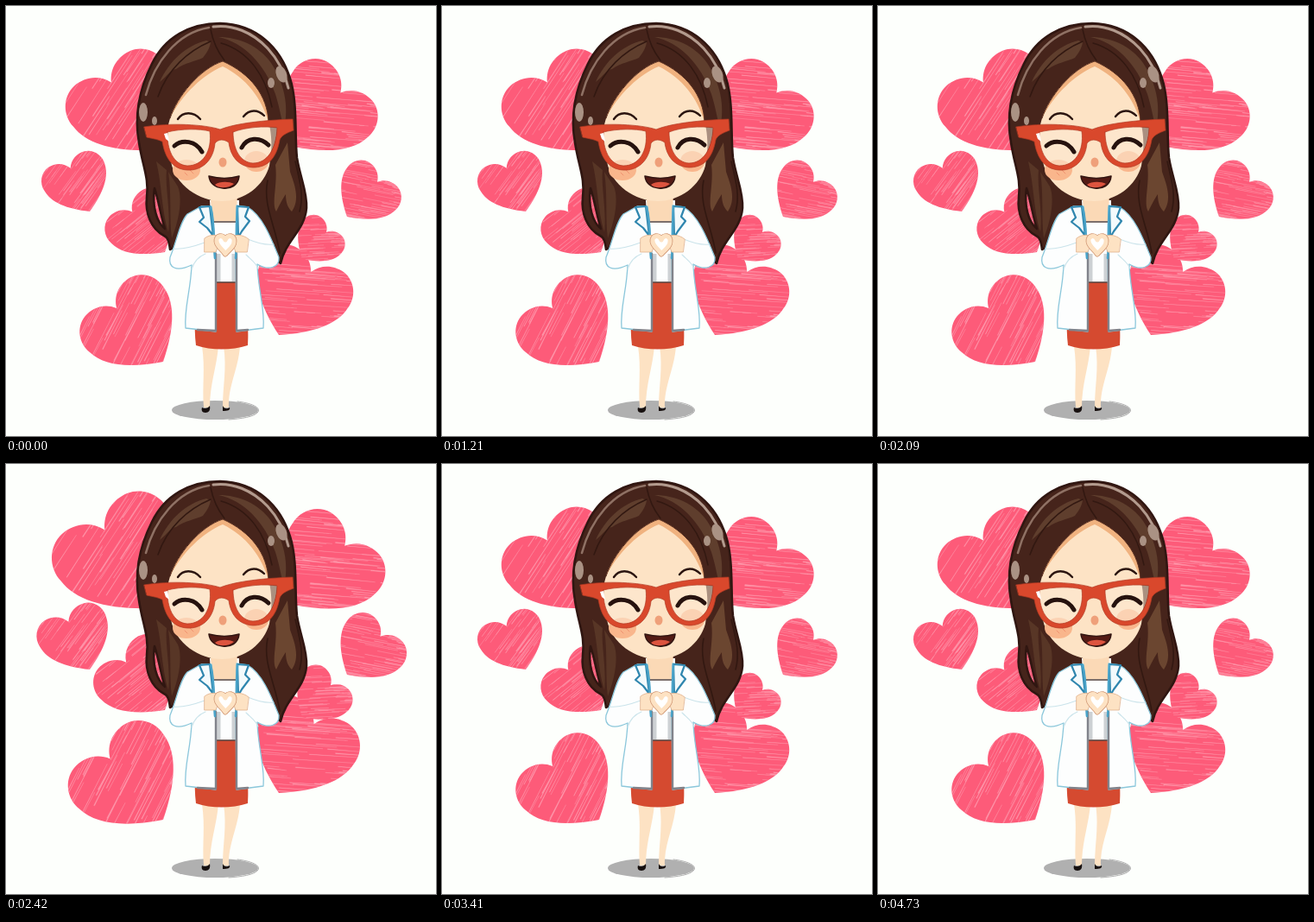
These frames come from a looping animation (498x498 px, 4.84 s). An HTML page:

```html
<!DOCTYPE html>
<html lang="en">
<head>
<meta charset="utf-8">
<title>Beating hearts</title>
<style>
  html, body { margin: 0; width: 100%; height: 100%; overflow: hidden; background: #fdfffc; }
  svg { display: block; width: 498px; height: 498px; }
</style>
</head>
<body>
<svg viewBox="0 0 498 498" fill="none" stroke-linecap="round" stroke-linejoin="round">
  <defs>
    <path id="heart" d="M0-82C7-96 21-101 34-99C50-96 60-80 57-64C55-42 35-20 0 0C-35-20-55-42-57-64C-60-80-50-96-34-99C-21-101-7-96 0-82Z"/>
    <clipPath id="inside"><use href="#heart"/></clipPath>
  </defs>

  <g id="hearts"></g>

  <g id="shadow">
    <ellipse cx="242" cy="468" rx="50" ry="11" fill="#b0b0b0"/>
    <path d="M268 458C285 460 295 465 292 470C288 476 272 478 258 479" stroke="#b0b0b0"/>
  </g>

  <g id="hair-back">
    <path fill-rule="evenodd" d="M248 20C290 21 318 48 329 84C338 112 334 150 337 176C341 200 349 215 348 234C346 260 324 271 318 298C308 290 298 276 292 255L210 255C204 272 196 279 190 282C189 274 188 268 183 266C168 258 161 240 163 222C166 200 158 185 154 158C148 125 155 95 169 67C184 36 213 20 248 20ZM172 211C169 231 174 250 184 258C179 242 177 226 172 211Z" fill="#46241b" stroke="#301611" stroke-width="2.6"/>
    <path d="M174 180C181 210 180 236 188 262C191 240 184 208 186 190ZM188 192C192 220 189 247 192 269C202 244 204 221 199 209Z" fill="#583626"/>
    <path d="M312 184C315 207 307 228 313 238C317 230 321 222 324 218C324 229 327 234 331 238C341 224 334 206 329 192L326 158Z" fill="#6b4630"/>
    <path d="M303 202C297 230 312 254 317 286M335 180C341 205 345 220 340 238" stroke="#321811" stroke-width="1.6"/>
    <path d="M232 40C208 46 189 64 178 88C188 80 190 74 197 73C207 66 219 64 228 60C232 55 236 49 237 42ZM246 36C275 42 299 66 312 102C317 118 319 132 322 142C328 115 322 89 307 66C293 46 270 36 246 36Z" fill="#5f3e2d"/>
    <path d="M162 103C172 65 198 31 235 25" stroke="#8f7164" stroke-width="2.6"/>
    <path d="M240 24C262 21 285 30 303 49C315 62 323 78 327 95" stroke="#b39b8e" stroke-width="3"/>
    <path d="M237 27C240 43 246 54 253 63M237 41C211 52 187 73 176 105M249 43C281 52 301 81 308 117" stroke="#321811" stroke-width="1.5"/>
  </g>

  <g id="legs">
    <path d="M227 394L246 394C244 418 236 438 236 465L229 465C227 440 231 420 227 394ZM252 394L271 394C269 421 257 440 258 465L251 465C251 440 256 420 252 394Z" fill="#fde2c3"/>
    <path d="M227 465C230 467 234 466 236 463C237 468 235 471 231 471C227 471 226 468 227 465ZM251 463C253 467 256 467 259 465C260 468 257 469 251 469Z" fill="#17100f"/>
  </g>

  <g id="clothes">
    <path d="M221 318L276 318C277 350 282 370 280 393C261 399 238 399 220 393C217 370 220 345 221 318Z" fill="#d54a30"/>
    <path d="M236 225L270 225L269 320L242 320Z" fill="#fdfefe"/>
    <path d="M236 212L268 212L267 249L239 249Z" fill="#fbd9b6"/>
    <path d="M246 287L246 319M264 287L264 319" stroke="#cdd1d4" stroke-width="5" stroke-linecap="butt"/>
    <path d="M240 250L267 250M243 320L267 320" stroke="#53403d" stroke-width="1.6"/>
    <g fill="#fdfefe" stroke="#8bc7db" stroke-width="1.3">
      <path d="M226 232L238 232L243 284L243 377L208 373C206 350 214 330 215 300C196 309 188 302 190 291C198 272 201 251 210 241Z"/>
      <path d="M267 231L280 233C296 242 306 266 316 291C317 303 304 307 291 299C292 330 300 350 298 373L267 377L266 284Z"/>
    </g>
    <path d="M230 274C219 278 203 282 194 281M231 287C221 291 217 298 215 305M280 270C292 275 303 277 310 276M278 288C284 294 290 298 292 304" stroke="#cbe4eb" stroke-width="1.1"/>
    <path d="M243 287L243 376L222 375M267 287L267 376L280 375" stroke="#81838b" stroke-width="2.4"/>
    <g fill="#f3fafc" stroke="#2f86ae" stroke-width="2.2">
      <path d="M224 233L236 232L240 266L233 257L224 250L229 245Z"/>
      <path d="M268 232L281 233L277 244L282 249L273 261L269 268Z"/>
    </g>
    <path d="M237 233C242 252 240 271 242 292M268 233C266 256 268 273 266 292" stroke="#4aa3c8" stroke-width="2.6"/>
  </g>

  <g id="hands">
    <path d="M230 269C236 264 246 264 249 269L243 285L230 285ZM281 270C274 264 264 264 260 269L266 285L279 285Z" fill="#fde2c3" stroke="#e0b08c" stroke-width=".8"/>
    <path id="gap" d="M254 271C251 264 243 266 244 273C245 279 251 282 254 287C258 282 264 279 264 273C265 266 257 264 254 271Z" stroke="#d6a07e" stroke-width="6.5"/>
    <use href="#gap" stroke="none"/>
    <path d="M254 271C251 264 243 266 244 273C245 279 251 282 254 287C258 282 264 279 264 273C265 266 257 264 254 271Z" fill="#fff" stroke="#fde2c3" stroke-width="5"/>
  </g>

  <g id="face">
    <path d="M251 64C225 72 198 105 190 130C184 148 187 166 191 180C196 208 224 226 250 226C276 226 299 208 305 185C313 150 304 92 251 64Z" fill="#fde3c5"/>
    <path d="M251 64C225 72 198 105 190 130C204 102 229 79 251 70C278 83 296 107 304 134C303 104 283 78 251 64Z" fill="#f0b27f"/>
    <path d="M251 64C225 72 198 105 190 130M304 134C303 104 283 78 251 64" stroke="#5a3021"/>
    <ellipse cx="209" cy="190" rx="16" ry="12" fill="#f9b68c"/>
    <ellipse cx="290" cy="180" rx="14" ry="12" fill="#f9b68c"/>
    <path d="M207 193L210 196M213 190L217 194" stroke="#ef9270"/>
    <ellipse cx="251" cy="181" rx="4.5" ry="5.5" fill="#efa07a"/>
    <path d="M199 131C205 122 217 122 225 131M275 128C282 119 292 120 299 127" stroke="#2b1510" stroke-width="2.4"/>
    <path d="M235 197C246 200 260 200 270 197C269 208 260 212 251 211C242 210 236 205 235 197Z" fill="#541b15" stroke="#321511" stroke-width="1.6"/>
    <path d="M242 207C247 203 258 203 264 206C258 211 247 212 242 207Z" fill="#dd543f"/>
  </g>

  <g id="glasses">
    <path d="M187 146C203 142 224 142 236 145C239 168 228 185 210 185C194 184 186 166 187 146ZM263 146C278 140 300 139 314 141C313 165 303 182 286 182C271 181 263 166 263 146Z" fill="#fde9d3" fill-opacity=".55"/>
    <path d="M195 162C204 154 220 156 227 169M273 164C279 152 294 151 304 161" stroke="#26120e" stroke-width="5"/>
    <path fill-rule="evenodd" d="M160 140C190 135 230 137 248 143C265 136 300 132 332 131L333 144C325 147 319 150 317 155C313 178 302 187 286 187C269 186 260 174 258 158C252 154 246 154 242 159C240 180 226 191 210 190C192 189 184 175 181 157C175 154 166 153 163 152ZM187 146C203 142 224 142 236 145C239 168 228 185 210 185C194 184 186 166 187 146ZM263 146C278 140 300 139 314 141C313 165 303 182 286 182C271 181 263 166 263 146Z" fill="#d9482c" stroke="#b03a25" stroke-width=".7"/>
    <path d="M183 148L187 147L189 157L185 154Z" fill="#fff"/>
  </g>

  <g id="hair-shine" fill="#aa9284">
    <ellipse cx="159" cy="123" rx="5" ry="11"/>
    <ellipse cx="172" cy="133" rx="3" ry="5"/>
    <ellipse cx="319" cy="79" rx="6" ry="10" transform="rotate(-22 319 79)"/>
    <ellipse cx="307" cy="89" rx="4" ry="6"/>
  </g>
</svg>

<script>
const STEP = 110;

// Tip x, tip y, tilt, size, beat size, scratch angle
const hearts = [
  [171, 167, -32, 1.13, 1.155, -58],
  [97, 238, -24, .67, 1.1, -55],
  [184, 285, -39, .73, 1.19, -40],
  [182, 412, -41, 1, 1.14, -64],
  [333, 163, 41, 1.01, 1.09, 4],
  [395, 244, 41, .65, 1.1, 10],
  [316, 381, 27, 1, 1.09, 3],
  [343, 293, 42, .51, 1.18, -4],
];

let seed = 7;
const random = () => (seed = seed * 16807 % 2147483647) / 2147483647;

// Thin tapered strokes, mostly running in from the ends
function scratches(count) {
  let d = '';
  for (let i = 0; i < count; i++) {
    const y = (random() - .5) * 124;
    const length = 20 + random() * 55;
    const x = random() < .6 ? 58 - length * random() * 1.3 : -65 + random() * 60;
    d += `M${x} ${y}l${length} ${random() * 2}l${-length} -.9z`;
  }
  return d;
}

const layer = document.getElementById('hearts');
layer.innerHTML = hearts.map(([, , tilt, size, , angle]) => `
  <g><use href="#heart" fill="#fd5b79"/>
    <g clip-path="url(#inside)">
      <path d="${scratches(85)}" transform="translate(0 -54) rotate(${angle - tilt})"
        fill="#ffd3dc" stroke="#ffd3dc" stroke-width="${.25 / size}" opacity=".5"/>
    </g></g>`).join('');
const groups = [...layer.children];

function draw(now) {
  const beat = Math.floor(now / STEP) % 4 === 2;
  hearts.forEach(([x, y, tilt, size, grow], i) => {
    const scale = beat ? size * grow : size;
    groups[i].setAttribute('transform', `translate(${x} ${y}) rotate(${tilt}) scale(${scale})`);
  });
}

let start;
function tick(now) {
  start ??= now;
  draw(now - start);
  requestAnimationFrame(tick);
}
draw(0);
requestAnimationFrame(tick);
</script>
</body>
</html>
```
